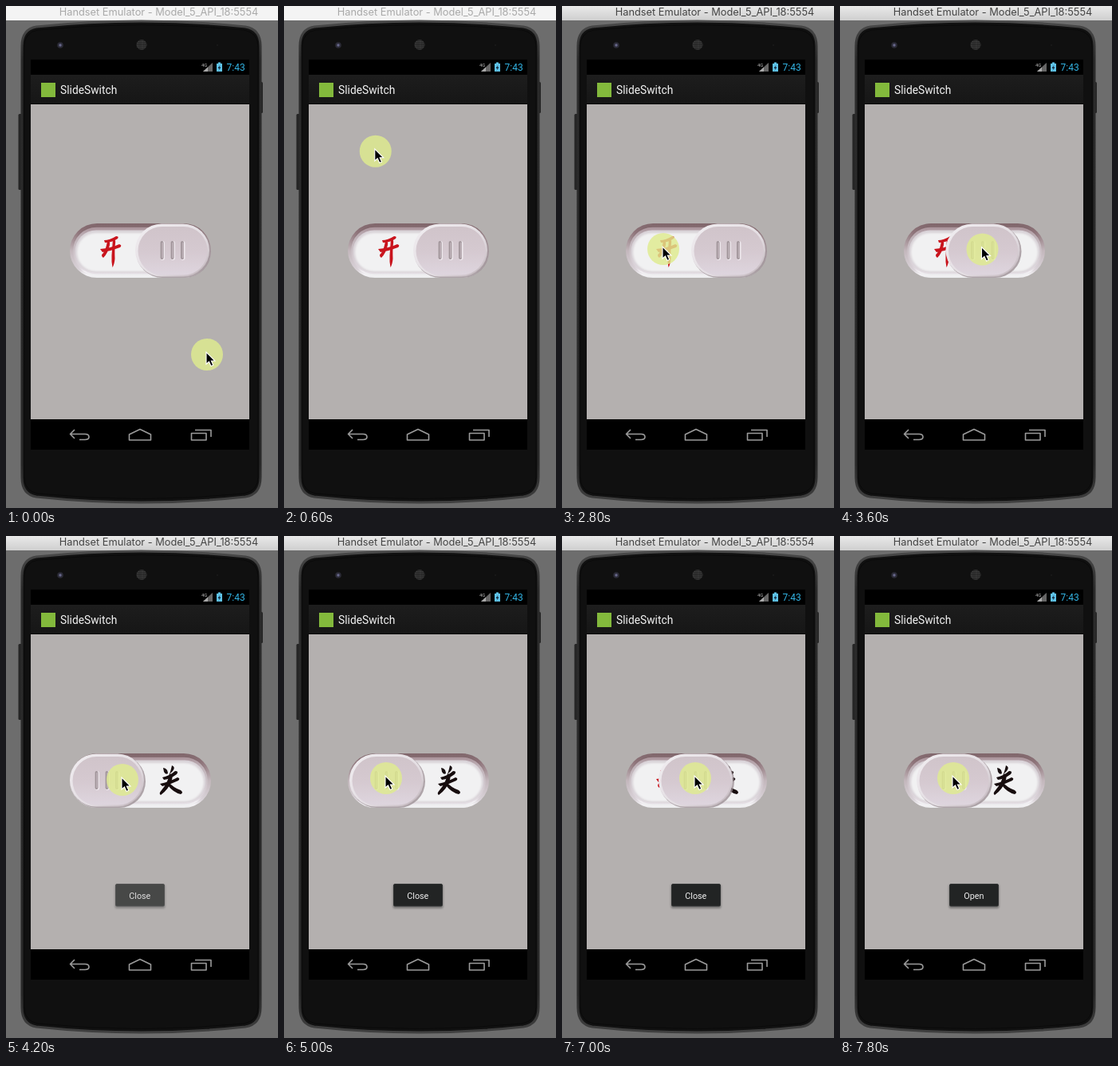
Write an HTML page that moves like this. It is 341x628 px and loops after 8 s.

```html
<!DOCTYPE html>
<html lang="en">
<head>
<meta charset="utf-8">
<title>SlideSwitch</title>
<style>
  html, body { margin: 0; width: 100%; height: 100%; overflow: hidden; background: #6d6d6d; }
  svg { display: block; width: 100%; height: 100%; }
  text { font-family: Roboto, sans-serif; }
  #caption { font: 12.8px Inter, sans-serif; }
  .line { fill: none; stroke: #9b9b9b; stroke-width: 1.6; stroke-linejoin: round; }
</style>
</head>
<body>
<svg viewBox="0 0 341 628">
  <defs>
    <linearGradient id="activeBar" x2="0" y2="1">
      <stop stop-color="#e9e9e9"/><stop offset="1" stop-color="#cfcfcf"/>
    </linearGradient>
    <linearGradient id="rim" x2="0" y2="1">
      <stop stop-color="#4a4a4a"/><stop offset=".08" stop-color="#2b2b2b"/>
      <stop offset=".92" stop-color="#292929"/><stop offset="1" stop-color="#404040"/>
    </linearGradient>
    <linearGradient id="well" x2="0" y2="1">
      <stop stop-color="#80666b"/><stop offset=".15" stop-color="#8d7379"/>
      <stop offset=".5" stop-color="#c3b7bc"/><stop offset=".85" stop-color="#d9d2d8"/>
      <stop offset=".94" stop-color="#f4f2f5"/><stop offset="1" stop-color="#ececee"/>
    </linearGradient>
    <linearGradient id="lip" x2="0" y2="1">
      <stop stop-color="#a99198"/><stop offset=".2" stop-color="#bdb0b6"/>
      <stop offset="1" stop-color="#e6e0e6"/>
    </linearGradient>
    <linearGradient id="edge" x2="1" y2="1">
      <stop stop-color="#f1eef1"/><stop offset=".6" stop-color="#e3dde2"/><stop offset="1" stop-color="#bdb1b7"/>
    </linearGradient>
    <linearGradient id="face" x2="0" y2="1">
      <stop stop-color="#d0c4ca"/><stop offset=".5" stop-color="#d5c9d0"/><stop offset="1" stop-color="#ded5de"/>
    </linearGradient>
    <linearGradient id="header" x2="0" y2="1">
      <stop stop-color="#1d1d1d"/><stop offset="1" stop-color="#161616"/>
    </linearGradient>
    <pattern id="mesh" width="2.4" height="2.4" patternUnits="userSpaceOnUse">
      <circle cx="1.2" cy="1.2" r=".8" fill="#4c4c4c"/>
    </pattern>
    <filter id="soft" x="-20%" y="-20%" width="140%" height="140%"><feGaussianBlur stdDeviation="1.2"/></filter>
    <g id="grip">
      <rect width="5.5" height="24" rx="2.7" fill="#efe9ee"/>
      <rect width="4" height="23" rx="2" fill="#9f9398"/>
      <rect x="1.5" y="1.5" width="2.5" height="20" rx="1.2" fill="#b9adb3"/>
    </g>
  </defs>

  <rect width="341" height="628" fill="#6d6d6d"/>
  <rect id="bar" width="341" height="18"/>
  <text id="caption" x="191.5" y="12" text-anchor="middle">Handset Emulator - Model_5_API_18:5554</text>

  <!-- Handset -->
  <rect x="15.5" y="135" width="6" height="95" rx="1.5" fill="#252525"/>
  <rect x="317" y="95" width="5" height="39" rx="1.5" fill="#252525"/>
  <path d="M20 50Q20 29 38 26Q170 12 300 26Q319 29 319 50V590Q319 611 300 614Q170 628 38 614Q20 611 20 590Z"
        fill="#111" stroke="url(#rim)" stroke-width="3"/>
  <path d="M23 51Q23 33 40 30Q170 17 298 30Q316 33 316 51V589Q316 607 298 610Q170 623 40 610Q23 607 23 589Z"
        fill="#101010" stroke="#0a0a0a"/>
  <circle cx="68" cy="49" r="3.8" fill="#2b2b36"/>
  <circle cx="68" cy="49" r="1.7" fill="#68688c"/>
  <circle cx="170" cy="48.5" r="6.5" fill="#202020"/>
  <circle cx="170" cy="48.5" r="6.5" fill="url(#mesh)"/>
  <circle cx="265" cy="49" r="1" fill="#1b1b1b"/>

  <!-- Screen -->
  <rect x="31" y="67" width="274" height="488"/>
  <text x="245" y="76" font-size="6" fill="#bbb">4G</text>
  <path d="M259 71V82H247Z" fill="#666"/>
  <path d="M253 76.5V82H247Z" fill="#aaa"/>
  <path d="M264 72h2v-1.5h3V72h2v10h-7Z" fill="#5fc3ea"/>
  <path d="M268.5 73.5L265.5 78h2l-1 3 3-4.500h-2Z" fill="#123"/>
  <text x="276.500" y="81" font-size="12" fill="#33b5e5">7:43</text>
  <rect x="31" y="86" width="274" height="37" fill="url(#header)"/>
  <rect x="31" y="122" width="274" height="1" fill="#0a0a0a"/>
  <rect x="44" y="96" width="18" height="18" fill="#83b93c"/>
  <text x="68" y="109.500" font-size="13.800" fill="#f3f3f3">SlideSwitch</text>
  <rect x="31" y="123" width="274" height="394" fill="#b4b0af"/>
  <g class="line">
    <path d="M86 530L80.500 535.500L86 541M81 535.500H99Q104 535.500 104 539T99 542.500H92"/>
    <path d="M154.500 543V536L168 529.500L181.500 536V543Z"/>
    <path d="M232.500 534.500H251V543H232.500ZM237 530.500H257V539"/>
  </g>

  <!-- Switch -->
  <rect x="80" y="272" width="177" height="68" rx="34" fill="url(#well)"/>
  <rect x="83.500" y="276" width="170" height="60" rx="30" fill="url(#lip)" stroke="url(#well)" stroke-width="1.500"/>
  <rect x="86.500" y="280.500" width="164" height="53" rx="26.500" fill="#d9d3d8"/>
  <rect x="89" y="284" width="159" height="48" rx="24" fill="#f1f1f2" filter="url(#soft)"/>
  <g fill="#c9141d">
    <path d="M123 293Q130 293 138 288Q142 288 140 291Q133 296 124 296Z"/>
    <path d="M118 304Q131 303 142 298Q146 299 143 302Q133 306 121 308Z"/>
    <path d="M127 293Q131 294 130 299Q128 309 122 315Q118 312 122 309Q126 303 127 293Z"/>
    <path d="M134 291Q138 292 137 297Q136 305 136.500 316Q136 323 133.500 327Q132 320 132.500 312Z"/>
  </g>
  <g fill="#170d0e">
    <path d="M197 290Q203 291 203 297Q200 299 198 295Z"/>
    <path d="M208 287Q213 289 209 294L205 298Q207 292 208 287Z"/>
    <path d="M196 302Q205 300 212 294Q217 294 214 298Q206 304 198 305Z"/>
    <path d="M193 310Q206 307 215 302Q219 303 216 306Q206 311 196 313Z"/>
    <path d="M205 297Q210 299 208 305Q204 317 194 324Q191 322 195 318Q203 309 205 297Z"/>
    <path d="M204 308Q210 315 219 318Q223 321 219 323Q210 321 203 312Z"/>
  </g>
  <g id="knob">
    <rect x="1" y="2" width="94" height="66" rx="33" fill="#988b90" opacity=".75"/>
    <rect width="93" height="66" y=".5" rx="33" fill="url(#edge)"/>
    <rect x="3.500" y="4" width="87" height="60.500" rx="30" fill="url(#face)"/>
    <use href="#grip" x="31.500" y="22"/>
    <use href="#grip" x="44.500" y="22"/>
    <use href="#grip" x="57" y="22"/>
  </g>

  <g id="toast">
    <rect x="136.500" y="436" width="63" height="30" rx="2.500" fill="#555" opacity=".6" filter="url(#soft)"/>
    <rect x="137.500" y="435.500" width="61" height="27.500" rx="1.500" fill="#222424" stroke="#303232"/>
    <text id="message" x="167.800" y="453.500" font-size="10.800" fill="#f0f0f0" text-anchor="middle"></text>
  </g>

  <g id="pointer">
    <circle r="20" fill="#e0ec8f" opacity=".82"/>
    <path d="M-1 -3V12L2.500 9L5 14.500L7.800 13.300L5.400 8H10Z" stroke="#fff" stroke-width="1.100"/>
  </g>
</svg>
<script>
const LOOP = 8000, STEP = 200, LEFT = 80, RIGHT = 162, GRAB = 46;

// [ms, x, y]
const path = [
  [0, 252, 436], [800, 69, 97], [1400, 145, 301], [2200, 127, 304], [2800, 127, 304],
  [3200, 207, 304], [4000, 150, 305], [4200, 146, 305], [4800, 146, 305], [5000, 128, 303],
  [5200, 128, 303], [6000, 200, 303], [6400, 208, 303], [7000, 167, 303], [7800, 142, 303]
];
// [ms, text, opacity]
const toasts = [
  [0, "", 0], [4200, "Close", .74], [4400, "Close", 1],
  [7400, "Close", .5], [7600, "Open", .6], [7800, "Open", 1]
];

const el = id => document.getElementById(id);
const move = (id, x, y) => el(id).setAttribute("transform", `translate(${x} ${y})`);
const latest = (table, t) => table.findLast(row => row[0] <= t);

function pointerAt(t) {
  const from = latest(path, t), to = path[path.indexOf(from) + 1] || from;
  const k = to === from ? 0 : (t - from[0]) / (to[0] - from[0]);
  return [1, 2].map(i => from[i] + (to[i] - from[i]) * k);
}

function knobAt(t, x) {
  if (t < 3200) return RIGHT;
  if (t >= 4200 && t < 5000) return LEFT;
  return Math.min(RIGHT, Math.max(LEFT, x - GRAB));
}

function draw(t) {
  const [x, y] = pointerAt(t), active = t >= 1800;
  move("pointer", x, y);
  move("knob", knobAt(t, x), 272);
  el("bar").setAttribute("fill", active ? "url(#activeBar)" : "#f4f4f4");
  el("caption").setAttribute("fill", active ? "#444" : "#a9a9a9");
  const [, text, opacity] = latest(toasts, t);
  el("message").textContent = text;
  el("toast").setAttribute("opacity", opacity);
}

const start = performance.now();
function tick() {
  const t = (performance.now() - start) % LOOP;
  draw(Math.floor(t / STEP) * STEP);
  requestAnimationFrame(tick);
}
tick();
</script>
</body>
</html>
```
